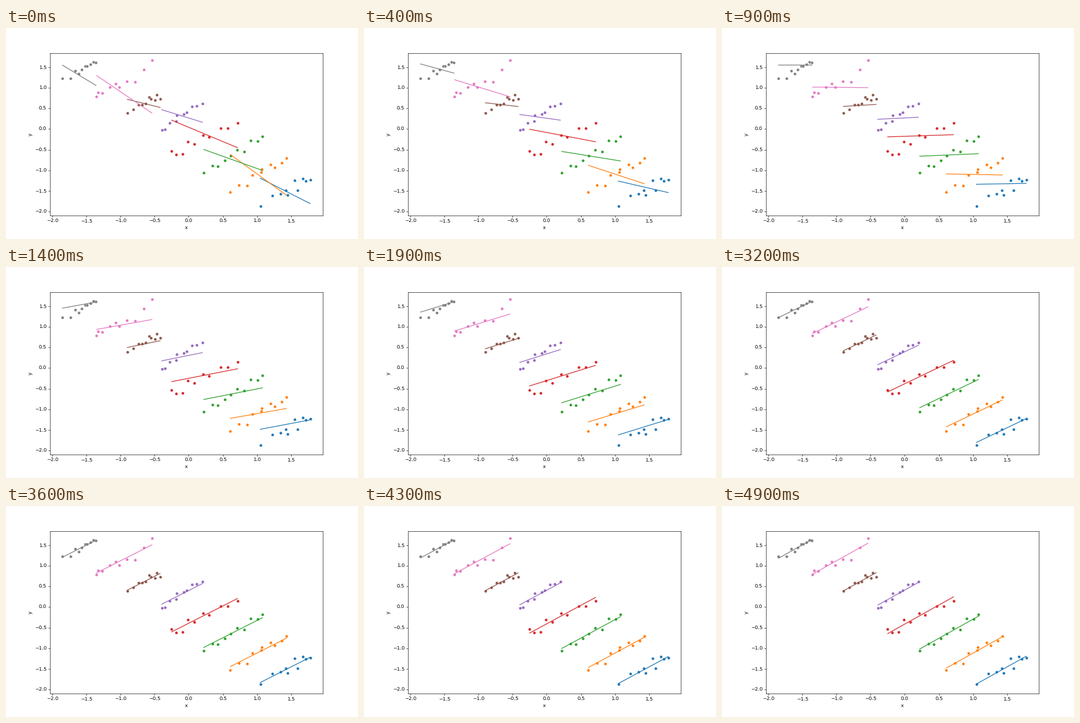
Recreate the animation shown at these times as a matplotlib script. Size 600 by 360 pixels, loop 5 s.

```python
import matplotlib.pyplot as plt
import numpy as np
from matplotlib.animation import FuncAnimation

FRAMES = 50
POINTS = 10
TRUE_SLOPE = 0.98
START_SLOPE = -0.79  # mean slope of all lines before fitting

# left, right, skew of points, fitted centre, first centre, first slope, drift
GROUPS = [
    (1.05, 1.78, 0.65, -1.53, -1.50, -0.84, 0.20),
    (0.61, 1.43, 0.83, -1.10, -1.11, -1.20, 0.00),
    (0.22, 1.08, 0.90, -0.62, -0.75, -0.59, 0.00),
    (-0.25, 0.715, 1.30, -0.20, -0.12, -0.69, 0.03),
    (-0.395, 0.20, 1.15, 0.32, 0.315, -0.51, -0.06),
    (-0.90, -0.42, 0.75, 0.61, 0.62, -0.41, -0.04),
    (-1.35, -0.54, 1.55, 1.17, 0.84, -1.12, -0.14),
    (-1.85, -1.36, 0.67, 1.405, 1.30, -1.00, 0.15),
]


def scatter_points(rng, left, right, skew, center):
    """Points spread unevenly from left to right around the true line."""
    t = np.linspace(0, 1, POINTS)
    spread = t ** skew + 0.12 * t * (1 - t) * rng.normal(size=POINTS)
    x = left + (right - left) * spread
    noise = rng.normal(0, 0.07, POINTS)
    return x, center + TRUE_SLOPE * (x - (left + right) / 2) + noise


def fitted_ends(step, left, right, center, first_center, first_slope, drift):
    """Heights of a line's two ends after a number of fitting steps."""
    slope = (TRUE_SLOPE
             + (START_SLOPE - TRUE_SLOPE) * np.exp(-0.07 * step)
             + (first_slope - START_SLOPE) * np.exp(-0.2 * step))
    swing = (step / 9 * np.exp(1 - step / 9)) ** 2
    middle = (center + (first_center - center) * np.exp(-0.3 * step)
              + drift * swing)
    rise = slope * (right - left) / 2
    return [middle - rise, middle + rise]


plt.rcParams["text.hinting"] = "none"
fig, ax = plt.subplots(figsize=(10, 6), dpi=60)
ax.set(xlim=(-2.0335, 1.9648), ylim=(-2.102, 1.832), xlabel="x", ylabel="y")
ax.set_xticks(np.arange(-2, 1.6, 0.5))
ax.set_yticks(np.arange(-2, 1.6, 0.5))

rng = np.random.default_rng(4)
lines = []
for i, (left, right, skew, center, *_) in enumerate(GROUPS):
    x, y = scatter_points(rng, left, right, skew, center)
    ax.scatter(x, y, s=36, color=f"C{i}", edgecolors="white",
               linewidths=0.48, snap=False)
    lines += ax.plot([left, right], [center, center], color=f"C{i}")


def update(step):
    for line, (left, right, _, *fit) in zip(lines, GROUPS):
        line.set_ydata(fitted_ends(step, left, right, *fit))
    return lines


anim = FuncAnimation(fig, update, frames=FRAMES, interval=100, repeat=True)
plt.show()
```
